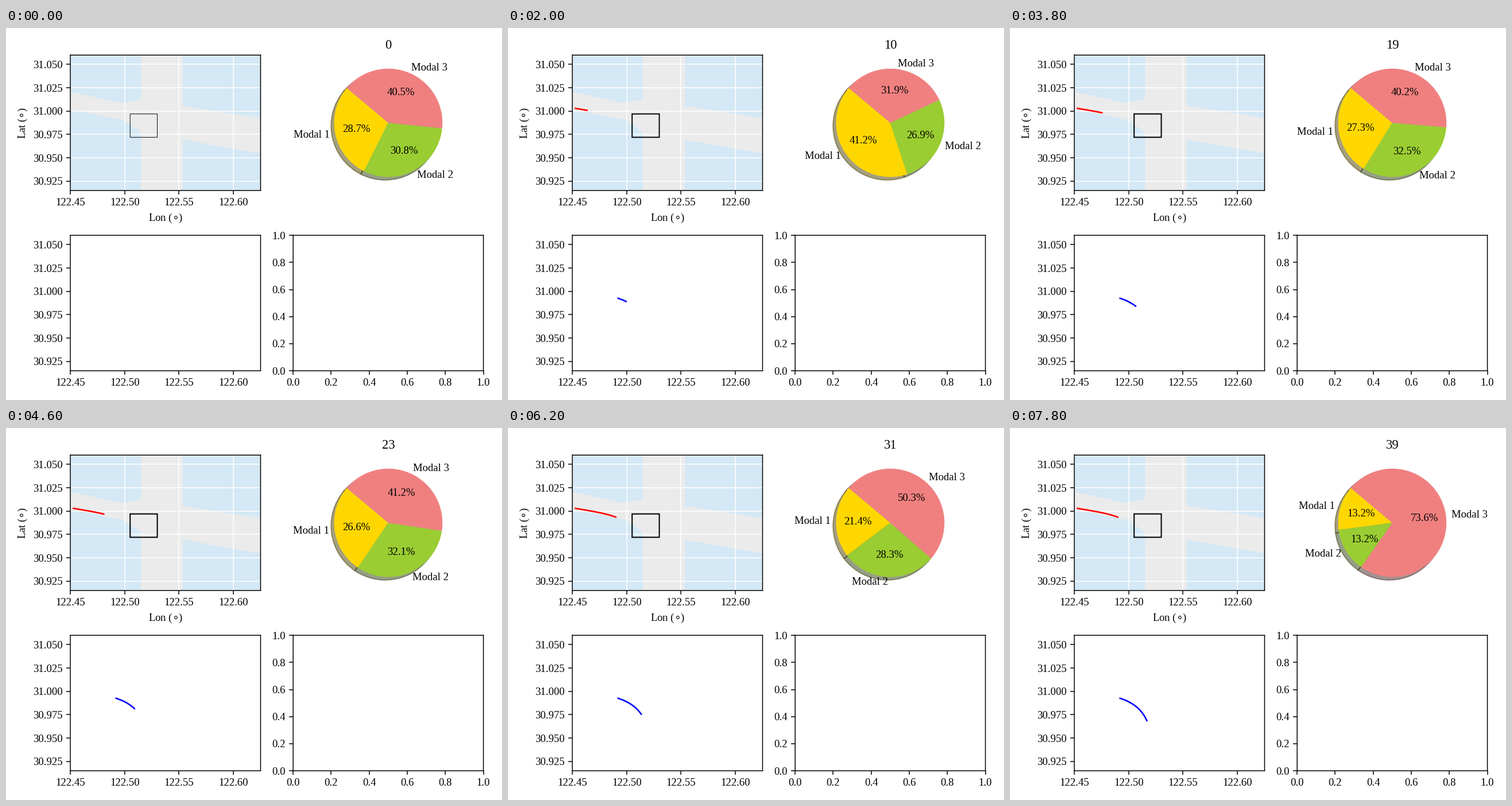
These frames come from a looping animation (864 by 648 pixels, 8000 ms). A matplotlib script:

```python
import numpy as np
import matplotlib.pyplot as plt
from matplotlib.animation import FuncAnimation
from matplotlib.patches import Rectangle

W, H, DPI = 864, 648, 135
STEPS, INTERVAL = 40, 200
LON, LAT = (122.45, 122.625), (30.915, 31.06)
LEFT, RIGHT = (112.05, 443.45), (500.2, 831.6)
TOP, BOTTOM = (47.2, 283.1), (361.1, 597.1)

plt.rcParams.update({"font.family": "Liberation Serif", "font.size": 10})
fig = plt.figure(figsize=(W / DPI, H / DPI), dpi=DPI, facecolor="white")


def panel(xs, ys):
    ax = fig.add_axes([xs[0] / W, 1 - ys[1] / H,
                       (xs[1] - xs[0]) / W, (ys[1] - ys[0]) / H])
    for spine in ax.spines.values():
        spine.set_snap(False)
    return ax


def map_panel(ys):
    ax = panel(LEFT, ys)
    ax.set(xticks=122.45 + 0.05 * np.arange(4),
           yticks=30.925 + 0.025 * np.arange(6))
    ax.set(xlim=LON, ylim=LAT, autoscale_on=False)
    ax.xaxis.set_major_formatter("{x:.2f}")
    ax.yaxis.set_major_formatter("{x:.3f}")
    return ax


def geo(x, y, ys=TOP):
    """Stage pixels to longitude and latitude."""
    return np.interp(x, LEFT, LON), np.interp(y, ys, LAT[::-1])


# Map: a vertical channel and two side arms
chart = map_panel(TOP)
chart.set_facecolor("#d4e8f5")
chart.grid(color="white")
chart.set_xlabel(r"Lon ($\circ$)")
chart.set_ylabel(r"Lat ($\circ$)")
chart.axvspan(122.515, 122.5535, color="#ebebeb", lw=0)
west = [(112, 111), (200, 130.5), (235.5, 124), (235.5, 181), (204, 160), (112, 142)]
east = [(308, 135.5), (443.5, 157), (443.5, 218.5), (308, 194.5)]
for arm in (west, east):
    chart.fill(*geo(*np.transpose(arm)), color="#ebebeb", lw=0)
box = Rectangle((122.505, 30.972), 0.025, 0.025, fill=False, snap=False, zorder=3)
chart.add_patch(box)

track = map_panel(BOTTOM)
pie_ax = panel(RIGHT, TOP)
panel(RIGHT, BOTTOM)

# Ship tracks: one bends at its end, the other turns steadily
s = np.arange(29)
red = geo(117.5 + 2.51 * s, 140 + 0.42 * s + 3.5 * (s / 28) ** 4)
s = np.arange(STEPS - 2)
blue = geo(191.7 + 1.88 * s - 0.0168 * s**2,
           470.8 + 0.6 * s + 0.0123 * s**2, BOTTOM)
red_line, = chart.plot([], [], color="red", lw=1.4)
blue_line, = track.plot([], [], color="blue", lw=1.4)

# Key shares of the first two modes; the third takes the rest
KEYS = [0, 4, 10, 19, 27, 31, 39]
FIRST = [28.7, 49.5, 41.2, 27.3, 26.0, 21.4, 13.2]
SECOND = [30.8, 22.5, 26.9, 32.5, 31.7, 28.3, 13.2]


def draw(i):
    n = max(i - 1, 0)
    red_line.set_data(red[0][:n], red[1][:n])
    blue_line.set_data(blue[0][:n], blue[1][:n])
    # The box edge darkens and widens as it is drawn over again
    box.set_linewidth(0.36 * (3 - 2 * 0.8 ** (i + 1)))

    a, b = np.interp(i, KEYS, FIRST), np.interp(i, KEYS, SECOND)
    pie_ax.clear()
    pie_ax.pie([a, b, 100 - a - b],
               labels=[f"Modal {k}" for k in (1, 2, 3)],
               colors=["gold", "yellowgreen", "lightcoral"],
               autopct="%1.1f%%", startangle=140,
               shadow={"ox": -0.03, "oy": -0.03})
    pie_ax.set_title(str(i))
    return []


anim = FuncAnimation(fig, draw, frames=STEPS, interval=INTERVAL,
                     init_func=lambda: draw(0), repeat=True, repeat_delay=0)
plt.show()
```
